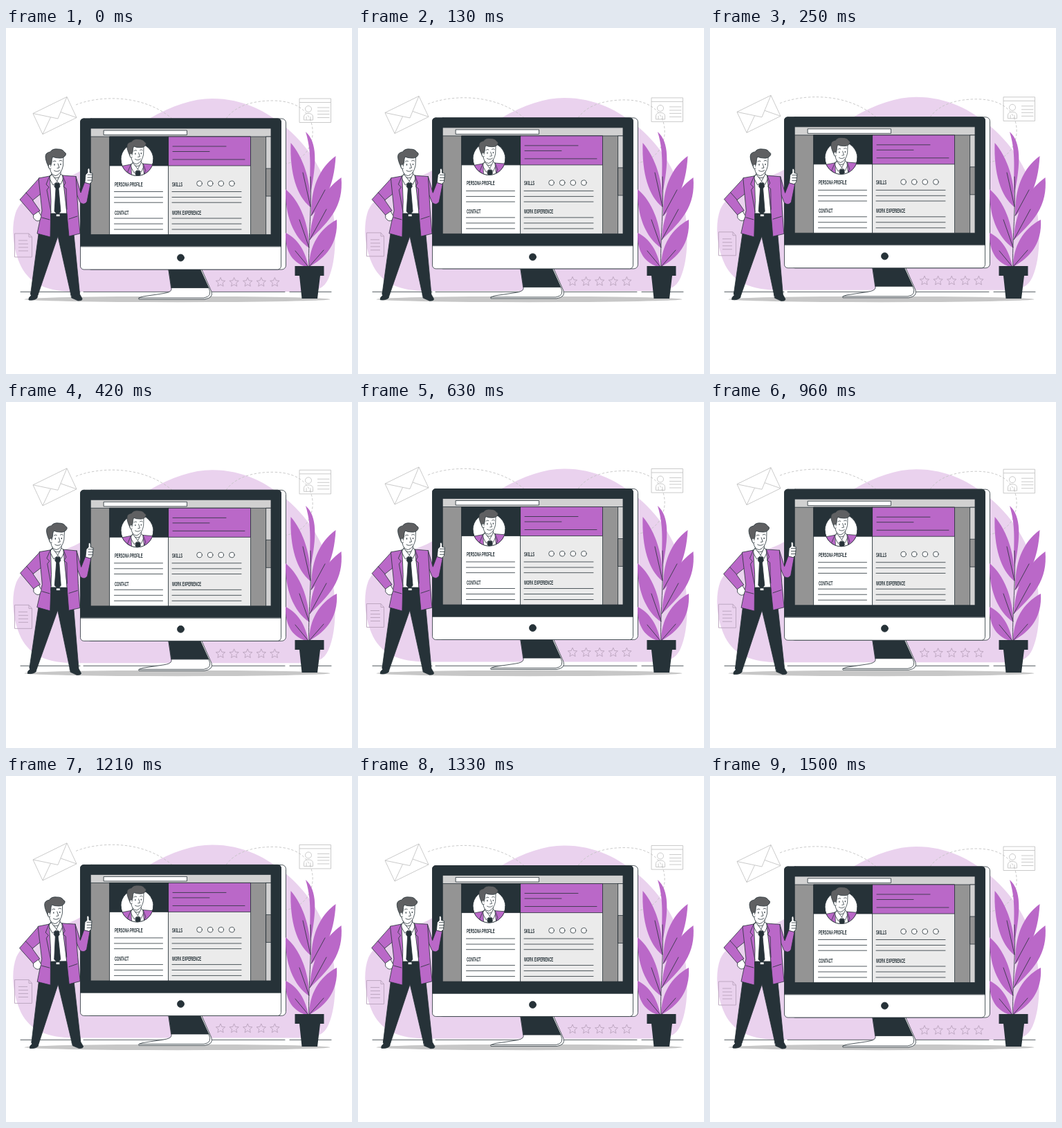
Write an HTML page that moves like this. It is 500 px wide and 500 px high and loops after 1540 ms.

```html
<!DOCTYPE html>
<html lang="en">
<head>
<meta charset="utf-8">
<title>Persona profile</title>
<style>
  html, body { margin: 0; width: 100%; height: 100%; overflow: hidden; background: #fff; }
  svg { display: block; width: 100%; height: 100%; }
  .dark { fill: #263238; }
  .purple { fill: #ba68c8; }
  .line { fill: none; }
  .ink { stroke: #263238; stroke-width: .8; stroke-linejoin: round; stroke-linecap: round; }
  .pale { fill: none; stroke: #c4c4c4; stroke-width: .9; stroke-linejoin: round; }
  .mauve { fill: none; stroke: #b9a3bd; stroke-width: .9; stroke-linejoin: round; }
  text { font: bold 8.2px "Liberation Sans", Arial, sans-serif; fill: #263238; }
</style>
</head>
<body>
<svg viewBox="0 0 500 500">
  <defs>
    <clipPath id="portrait"><path d="M160 150H220V190H213A23.500 23.500 0 0 1 166 190H160Z"/></clipPath>
    <g id="bust" class="ink">
      <path fill="#fff" d="M62 215L66 211L79 211L83 215L88 268H63Z"/>
      <path class="dark" d="M71 224L77 224L78 229L76 232L79 265L75 270L70 265L72 232L70 229Z"/>
      <path fill="#fff" d="M66 206V213Q72 220 79 214V204Z"/>
      <path fill="#fff" d="M66 212L62 216L68 227L74 222L79 226L84 215L79 211L74 221Z"/>
      <path class="purple" d="M63 214L47 217L52 264L45 297L64 302L65 250Z"/>
      <path class="purple" d="M82 213L101 214.500L104 262L107 297L91 301L87 258Z"/>
      <path class="line" d="M63 214L58 226L62 230L59 234L65 266M82 213L86 224L83 229L87 232L88 262M52 274L63 277M91 276L103 272"/>
      <path fill="#fff" d="M62 186L63.500 203Q65 213 72 213.500Q80 211 82.500 199L83 185Z"/>
      <path fill="#5f6062" d="M62.500 203L59 195Q55 184 59 181Q62 179 64 179Q67 174 75 175Q82 175 84 179Q88 181 86 184Q83 188.500 77 188Q71 188 67.500 186Q66 189 66 194L64.500 200Z"/>
      <path fill="#fff" d="M64 197Q60 197 62 202Q63 205 65 203"/>
      <path class="line" d="M68 193Q70 191 72 192.500M77 192Q79 190 81 192M75 196L77 202L74 202.500M69.500 206Q74 209 78 205.500"/>
      <path class="line" stroke-width="1.300" d="M70 197V198M79 196.500V197.500"/>
    </g>
  </defs>

  <g id="backdrop">
    <path fill="#ead2ee" d="M298 102C343 102 378 121 406 145C440 174 462 212 470 250C478 290 478 335 466 362C460 376 448 381 430 381H100C60 381 35 370 22 345C9 318 7 285 15 264C25 243 50 232 90 215C140 196 165 150 207 131C240 112 270 102 298 102Z"/>
    <g class="pale">
      <path d="M39 123.500L88 99.500L102 129.500L53 153.500ZM39 123.500L75 131L88 99.500M53 153.500L64.500 129M102 129.500L79 121.500"/>
      <path d="M424 102H469.500V136.500H424ZM424 107.500H469.500M450 115H467.500M450 120H467.500M450 124.500H467.500M450 129.500H467.500"/>
      <circle cx="437" cy="117" r="4.500"/>
      <path d="M430.500 133V128Q431 123.500 437 123.500Q443 123.500 443.500 128V133ZM434 133V128M440 133V128"/>
      <g stroke-dasharray="3.500 2.500">
        <path d="M101 111C130 99 195 93 240 131"/>
        <path d="M318 131C332 111 360 105 385 105C430 105 445 130 443 155C440 180 425 192 405 196"/>
      </g>
    </g>
    <path class="mauve" d="M12.500 297H33L37.500 302V331H12.500ZM33 297V302H37.500M18 307H31M18 312H32M18 317H32M18 322H32"/>
    <g id="stars" class="mauve"></g>
  </g>

  <path class="line ink" d="M21 381.300H107M112 381.300H403M410 381.300H470"/>
  <ellipse cx="247.500" cy="392" rx="221" ry="4.200" fill="#c7c7c7"/>

  <g id="monitor">
    <g class="ink">
      <path fill="#fff" d="M239 374V378Q238 382 228 383.500L198 388Q190 390 192 392H287Q300 390 297 381L282 347H235Z"/>
      <path class="line" d="M293 375.500Q299 388 286 390H192"/>
      <path class="dark" d="M235 347H280L293 375.500H239Z"/>
      <rect x="117" y="131" width="287.500" height="218" rx="6" fill="#fff"/>
      <rect x="107.500" y="131" width="290" height="218" rx="5" fill="#fff"/>
      <path class="dark" d="M107.500 315.500V136Q107.500 131 112.500 131H392.500Q397.500 131 397.500 136V315.500Z"/>
      <circle class="dark" cx="252.500" cy="332" r="5"/>
    </g>
    <g class="ink" stroke-linecap="butt">
      <rect x="122.500" y="145" width="260.500" height="153.500" fill="#949494"/>
      <rect x="122.500" y="145" width="260.500" height="12" fill="#d1d1d1"/>
      <rect x="141.500" y="148" width="120" height="6.500" fill="#fff"/>
      <rect x="376" y="157" width="7" height="141.500" fill="#d1d1d1"/>
      <rect x="376" y="203" width="7" height="40" fill="#949494"/>
      <rect x="150" y="157" width="85" height="141.500" fill="#fff"/>
      <rect x="235" y="157" width="118.500" height="141.500" fill="#ebebeb"/>
      <rect class="dark" x="150" y="157" width="85" height="42"/>
      <rect class="purple" x="235" y="157" width="118.500" height="42"/>
      <path class="line" d="M241 171H318M241 178.500H294M241 190H345"/>
      <path id="rows" class="line"/>
      <g id="dots" fill="#fff"></g>
      <circle cx="189.500" cy="190" r="23.500" fill="#fff"/>
    </g>
    <g clip-path="url(#portrait)"><use href="#bust" transform="translate(121.500 -3) scale(.935)"/></g>
    <path class="line ink" d="M213 190A23.500 23.500 0 0 1 166 190"/>
    <g id="labels"></g>
  </g>

  <g class="purple">
    <path d="M433 150C450 165 449 195 440 240C437 215 444 185 433 150Z"/>
    <path d="M411.500 166C410 210 420 243 440 259C441 222 430 187 411.500 166Z"/>
    <path d="M476.500 185C452 203 440 232 441 272C458 254 474 232 476.500 185Z"/>
    <path d="M484.500 216C457 236 440 268 439 306C468 278 488 258 484.500 216Z"/>
    <path d="M404 233C403 270 415 302 438 318C438 284 425 250 404 233Z"/>
    <path d="M478 277C453 290 438 315 438 345C462 332 480 312 478 277Z"/>
    <path d="M404 296C403 324 415 341 437 346C433 322 421 304 404 296Z"/>
  </g>
  <path class="line ink" stroke-width=".7" d="M438 346C436 310 442 270 440 215M429 209L440 258M461 234L441 271M424 277L438 317M463 262L439 306M459 321L438 345M418 322L437 345"/>
  <path class="dark" d="M417.500 344H459.500V358H454L450 391H427.500L424 358H417.500Z"/>

  <g id="man" class="ink">
    <path class="dark" d="M64 268H88L98 298L106.500 384L94 386L75 301L46 386L35.500 385L47 298Z"/>
    <path class="dark" d="M36 383L46 385L45 390Q41 394 33 393Q32 390 36 387Z"/>
    <path class="dark" d="M94 385L105 382L110 391Q111 394 104 394L95 390Z"/>
    <path class="purple" d="M48 217L20 248L40 271L49 264L38.500 249L51 239Z"/>
    <path class="purple" d="M101 214.500L108 238L114 222L122 225L117 251Q113 257 107 252L102 240Z"/>
    <use href="#bust"/>
    <path class="dark" d="M65 268.500H88V273H65Z"/>
    <path fill="#fff" d="M72.500 269H78V272.500H72.500Z"/>
    <path fill="#fff" d="M40 270L47 265L51 272L49 278Q44 281 40 275Z"/>
    <path fill="#fff" d="M114 223L115 212L118 209V204Q120 201 121 205L121 209L125 210L124 222L121 225Z"/>
    <path class="line" d="M118 212H124.500M118 216H124.500M118 220H124M29 238L39 249"/>
  </g>
</svg>
<script>
const get = id => document.getElementById(id);

const starPath = (cx, cy) => 'M' + Array.from({ length: 10 }, (_, i) => {
  const r = i % 2 ? 3.2 : 7, a = i * Math.PI / 5;
  return `${cx + r * Math.sin(a)} ${cy - r * Math.cos(a)}`;
}).join('L') + 'Z';

get('stars').innerHTML = [0, 1, 2, 3, 4]
  .map(i => `<path d="${starPath(310 + 19.6 * i, 367.5)}"/>`).join('');

get('dots').innerHTML = [0, 1, 2, 3]
  .map(i => `<circle cx="${279.5 + 15.6 * i}" cy="224.700" r="3.800"/>`).join('');

get('rows').setAttribute('d', [236.5, 244.5, 252.2, 275, 283, 291]
  .map(y => `M156.500 ${y}H226.500M240 ${y}H340`).join(''));

// Condensed lettering
get('labels').innerHTML = [
  ['PERSONA PROFILE', 157, 228.5], ['CONTACT', 157, 269.5],
  ['SKILLS', 240, 228.5], ['WORK EXPERIENCE', 240, 269.5]
].map(([label, x, y]) => `<text transform="translate(${x} ${y}) scale(.52 1)">${label}</text>`).join('');

const LOOP = 1540, FPS = 24, STEPS = 36, RISE = 6.6;

// Triangle wave: 0 at p = 0, 1 at .25, -1 at .75
const triangle = p => p < .25 ? 4 * p : p < .75 ? 2 - 4 * p : 4 * p - 4;

function draw(now) {
  const step = Math.min(STEPS, Math.floor((now % LOOP + 4) * FPS / 1000));
  const p = step / STEPS;
  const lift = `translate(0 ${-RISE * (1 - Math.abs(2 * p - 1))})`;
  get('backdrop').setAttribute('transform', lift);
  get('monitor').setAttribute('transform', lift);
  get('man').setAttribute('transform', `rotate(${triangle(p)} 72 284)`);
  requestAnimationFrame(draw);
}
draw(performance.now());
</script>
</body>
</html>
```
